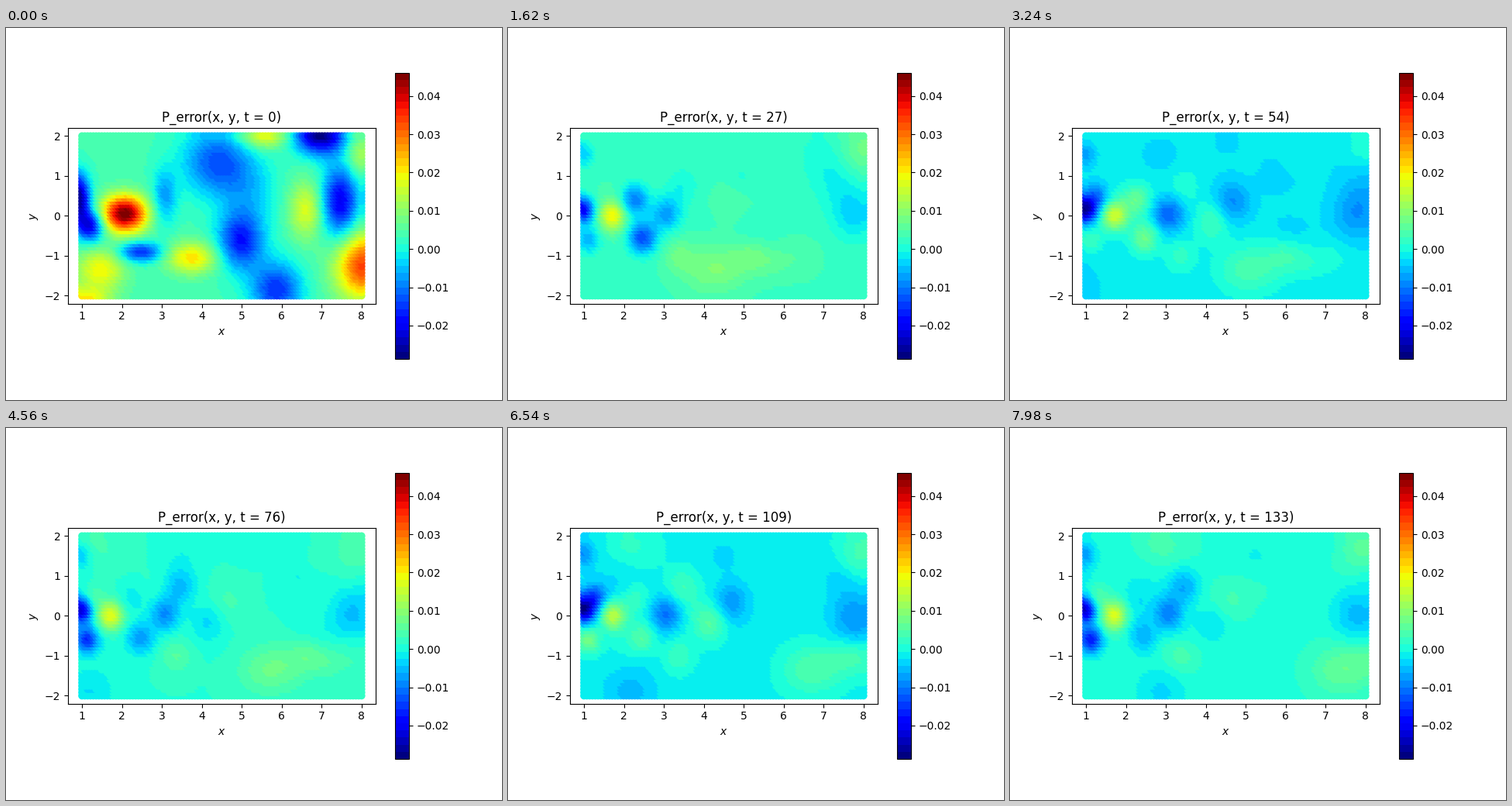
Animation of 640 by 480 pixels, one loop 8 s. Source, as a matplotlib script:

```python
import numpy as np
import matplotlib.pyplot as plt
from matplotlib.animation import FuncAnimation

STEP, TICK, LOOP = 60, 40, 8000    # ms per time step, per frame, per loop
PERIOD, PHASE = 58.5, 16           # vortex shedding, in time steps
FADE = 5                           # decay of the initial error
DRIFT = 0.03                       # downstream travel per time step
VMIN, VMAX = -0.02877, 0.0461

gx, gy = np.meshgrid(np.linspace(1, 8, 100), np.linspace(-2, 2, 50))
gx, gy = gx.ravel(), gy.ravel()

# Initial error: x, y, height in thousandths, two radii.
START = [
    (2.1, .1, 43, .4, .33), (.95, .5, -31, .2, .42), (1.25, -.2, -25, .25, .28),
    (2.5, -.85, -20, .38, .18), (1.5, -1.3, 16, .42, .38), (1, -2.1, 18, .5, .25),
    (3.8, -1, 18, .45, .28), (3.1, .5, -11, .22, .5), (4.4, 1.4, -16, .6, .6),
    (5, -.6, -20, .4, .5), (5.9, -1.8, -19, .45, .5), (5.2, .6, -7, .5, .7),
    (5.6, 2.1, 17, .42, .25), (7, 2.1, -32, .45, .35), (6.65, .2, 14, .3, .5),
    (7.5, .4, -24, .33, .65), (8, 1.6, 10, .28, .4), (8.1, -1.2, 31, .5, .6)]

# Shedding wake: x, y, mean height, swing, lag in cycles.
WAKE = [
    (1, .2, -24, 0, 0), (1.15, -.55, -3, -15, 0), (1.3, .5, -4, 9, 0),
    (1.75, .05, 17, 0, 0), (2.3, .45, -2, 12, -.25), (2.5, -.5, -3, -13, .2),
    (3.1, .1, -10, 0, 0), (3.5, .8, -1, -6, 0), (3.4, -.95, 4, 0, 0),
    (4.2, -.1, 2, -6, 0), (4.7, .4, -2, 5, .1), (7.8, .1, -6, 0, 0),
    (1, 1.6, -7, 0, 0), (8, 1.7, 5, 0, 0)]

rng = np.random.default_rng(4)
eddy_x, eddy_y = rng.uniform(0, 10, 30), rng.uniform(-2, 2, 30)
eddy_amp, eddy_r = rng.normal(0, 2, 30), rng.uniform(.25, .5, 30)


def blobs(xs, ys, amps, rx, ry):
    """Sum of Gaussian bumps on the grid."""
    total = np.zeros_like(gx)
    for x, y, a, p, q in zip(xs, ys, amps, rx, ry):
        total += a * np.exp(-(((gx - x) / p) ** 2 + ((gy - y) / q) ** 2) / 2)
    return total


def wave(t, lag):
    return np.cos(2 * np.pi * ((t - PHASE) / PERIOD - lag))


first = 3.5 + blobs(*np.transpose(START))
wake_x, wake_y, mean, swing, lag = np.transpose(WAKE)
wake_r = .2 + .03 * (wake_x - 1)


def error(t):
    level = .3 + 2.5 * wave(t, .22)
    wake = blobs(wake_x, wake_y, mean + swing * wave(t, lag), wake_r, wake_r * 1.15)
    eddies = blobs((eddy_x + DRIFT * t) % 10 - .5, eddy_y, eddy_amp, eddy_r, eddy_r)
    keep = np.exp(-t / FADE)
    return (keep * first + (1 - keep) * (level + wake + eddies)) / 1000


fig, ax = plt.subplots(figsize=(6.4, 4.8), dpi=100)
dots = ax.scatter(gx, gy, s=7 ** 2, c=error(0), cmap=plt.get_cmap("jet", 40),
                  vmin=VMIN, vmax=VMAX, linewidths=0)
fig.colorbar(dots, ax=ax)
ax.set_aspect("equal")
ax.set_xlim(0.65, 8.35)
ax.set_ylim(-2.2, 2.2)
ax.set_xticks(range(1, 9))
ax.set_xlabel("$x$")
ax.set_ylabel("$y$")
title = ax.set_title("P_error(x, y, t = 0)")


def update(frame):
    t = (frame * TICK + TICK // 2) // STEP
    dots.set_array(error(t))
    title.set_text(f"P_error(x, y, t = {t})")
    return dots, title


anim = FuncAnimation(fig, update, frames=LOOP // TICK, interval=TICK,
                     repeat=True, repeat_delay=0, blit=False)
plt.show()
```
